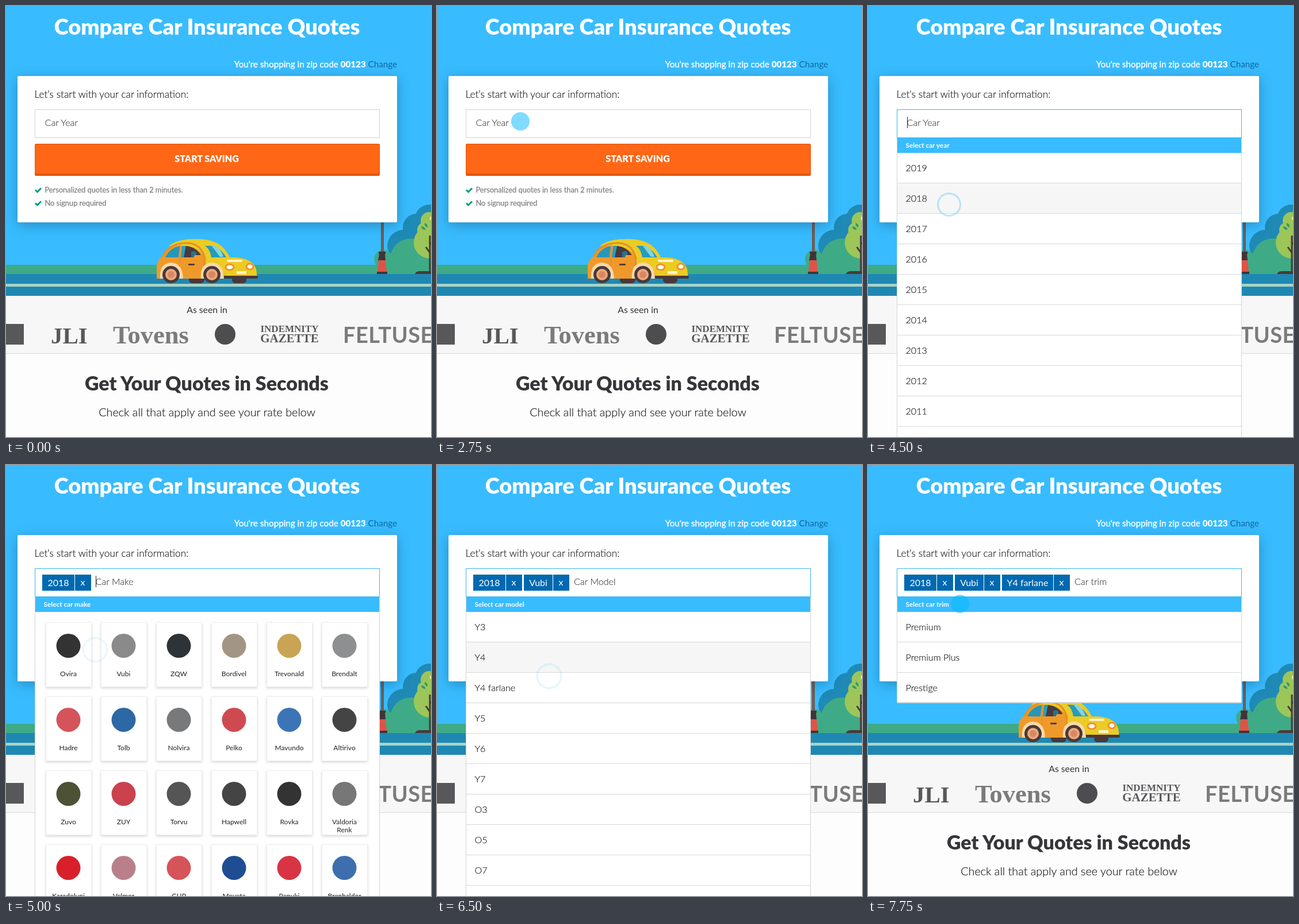
These frames come from a looping animation (739x751 px, 8 s). An HTML page:

```html
<!DOCTYPE html>
<html lang="en">
<head>
<meta charset="utf-8">
<title>Compare Car Insurance Quotes</title>
<style>
html, body { margin: 0; width: 100%; height: 100%; overflow: hidden; background: #fdfdfd; }
svg { display: block; width: 100%; height: 100%; font-family: Lato, sans-serif; }
.mid { text-anchor: middle; }
.black { font-weight: 900; }
.light, .row, .hint { font-weight: 300; fill: #1c1c1c; stroke: #1c1c1c; stroke-width: .2px; }
.row, .hint { font-size: 16.1px; }
.hint { fill: #444; stroke: #444; }
.head { font-size: 11.8px; font-weight: 700; fill: #fff; }
.make { font-size: 12px; fill: #222; text-anchor: middle; }
.note { font-size: 12.8px; fill: #808080; stroke: #808080; stroke-width: .25px; }
.chip rect { fill: #0069b0; }
.chip text { font-size: 16px; fill: #fff; }
.serif { font-family: "Liberation Serif", serif; font-weight: 700; }
.card { filter: drop-shadow(0 5px 11px rgba(0, 30, 60, .3)); }
.tile { filter: drop-shadow(0 2px 2px rgba(0, 0, 0, .16)); }

/* One loop is 8 s; every 3.125% is a 250 ms step. */
.timed { animation: 8s step-end infinite both; }
.caret { fill: #222; animation: blink 1s step-end infinite; }
.focus { animation-name: focus; }
.ask-year { animation-name: ask-year; }
.ask-make { animation-name: ask-make; }
.ask-model { animation-name: ask-model; }
.ask-trim, .chip-model { animation-name: ask-trim; }
.chip-year { animation-name: chip-year; }
.chip-make { animation-name: chip-make; }
#year { animation-name: list-year; }
#make { animation-name: ask-make; }
#model { animation-name: ask-model; }
#trim { animation-name: list-trim; }
#hover { animation-name: hover; }
#press { animation-name: press; }
#ring { animation-name: ring; }

@keyframes blink { 0% { opacity: 1 } 50%, to { opacity: 0 } }
@keyframes focus { 0% { opacity: 0 } 40.625%, to { opacity: 1 } }
@keyframes ask-year { 0% { opacity: 1 } 59.375%, to { opacity: 0 } }
@keyframes ask-make { 0% { opacity: 0 } 59.375% { opacity: 1 } 71.875%, to { opacity: 0 } }
@keyframes ask-model { 0% { opacity: 0 } 71.875% { opacity: 1 } 87.5%, to { opacity: 0 } }
@keyframes ask-trim { 0% { opacity: 0 } 87.5%, to { opacity: 1 } }
@keyframes chip-year { 0% { opacity: 0 } 59.375%, to { opacity: 1 } }
@keyframes chip-make { 0% { opacity: 0 } 71.875%, to { opacity: 1 } }
@keyframes list-year { 0% { opacity: 0 } 40.625% { opacity: 1 } 59.375%, to { opacity: 0 } }
@keyframes list-trim { 0% { opacity: 0 } 96.875%, to { opacity: 1 } }
@keyframes hover {
  0% { opacity: 0; transform: translateY(0) }
  43.75% { opacity: 1; transform: translateY(0) }
  50% { transform: translateY(53px) }
  59.375% { opacity: 0 }
  75% { opacity: 1; transform: translateY(53px) }
  84.375% { transform: translateY(106px) }
  87.5%, to { opacity: 0; transform: translateY(0) }
}
@keyframes press {
  0% { opacity: 0; transform: translate(123px, 315px) }
  12.5% { opacity: 1; transform: translate(123px, 315px) }
  15.625% { transform: translate(130px, 270px) }
  18.75% { transform: translate(140px, 214px) }
  21.875% { opacity: 0 }
  28.125% { opacity: 1; transform: translate(145px, 219px) }
  31.25% { opacity: 0 }
  34.375% { opacity: 1; transform: translate(145px, 201px) }
  40.625% { opacity: 0 }
  43.75% { opacity: 1; transform: translate(137px, 290px) }
  46.875% { transform: translate(139px, 308px) }
  50% { transform: translate(140px, 328px) }
  53.125% { transform: translate(141px, 346px) }
  56.25% { opacity: 0 }
  59.375% { opacity: 1; transform: translate(155px, 322px) }
  62.5% { opacity: 0 }
  65.625% { opacity: 1; transform: translate(175px, 322px) }
  68.75% { transform: translate(195px, 326px) }
  71.875% { opacity: 0 }
  75% { opacity: 1; transform: translate(194px, 330px) }
  78.125% { transform: translate(195px, 352px) }
  81.25% { opacity: 0 }
  84.375% { opacity: 1; transform: translate(200px, 390px) }
  87.5% { opacity: 0 }
  93.75% { opacity: 1; transform: translate(160px, 214px) }
  96.875%, to { opacity: 1; transform: translate(160px, 242px) }
}
@keyframes ring {
  0% { opacity: 0; transform: translate(145px, 180px) }
  21.875% { opacity: .5; transform: translate(145px, 180px) }
  25% { opacity: 0 }
  31.25% { opacity: .4; transform: translate(145px, 219px) }
  34.375% { opacity: 0 }
  40.625% { opacity: .5; transform: translate(145px, 201px) }
  43.75% { opacity: 0 }
  56.25% { opacity: .55; transform: translate(141px, 346px) }
  59.375% { opacity: 0 }
  62.5% { opacity: .18; transform: translate(155px, 322px) scale(1.06) }
  65.625% { opacity: 0 }
  71.875% { opacity: .5; transform: translate(195px, 326px) }
  75% { opacity: 0 }
  81.25% { opacity: .22; transform: translate(195px, 368px) scale(1.07) }
  84.375% { opacity: 0 }
  87.5% { opacity: .5; transform: translate(202px, 397px) }
  90.625% { opacity: .1; transform: translate(202px, 397px) scale(1.06) }
  93.75%, to { opacity: 0 }
}
</style>
</head>
<body>
<svg viewBox="0 0 739 751">
  <rect width="739" height="505" fill="#38bcff"/>

  <!-- scenery -->
  <g fill="#1f8ab5">
    <circle cx="691" cy="418" r="28"/><circle cx="714" cy="386" r="24"/><circle cx="736" cy="371" r="25"/>
    <rect x="700" y="385" width="39" height="70"/>
  </g>
  <rect y="451" width="739" height="16" fill="#3fab86"/>
  <g fill="#3fab86">
    <circle cx="656" cy="441" r="16"/><circle cx="704" cy="441" r="36"/><rect x="652" y="436" width="87" height="31"/>
  </g>
  <g fill="#9cc659">
    <circle cx="737" cy="412" r="28"/><circle cx="736" cy="374" r="15"/><circle cx="728" cy="390" r="13"/>
  </g>
  <circle cx="741" cy="370" r="4" fill="#f4edb0"/>
  <path d="M722 384q6 0 8 6q-8 0 -8 -6M728 378q6 2 5 8q-6 -2 -5 -8" fill="#2c9a6b"/>
  <path d="M737 400V463M737 430L730 420M737 416L739 412" stroke="#4b3b39" stroke-width="3" fill="none"/>
  <path d="M711 467q2 -5 9 -5h19v5z" fill="#493a38"/>
  <rect x="652" y="370" width="5" height="60" fill="#705d54"/>
  <path d="M648 428h12v4h-1l1 12h-13l2 -12h-1zM645 463h18v4h-18z" fill="#40343a"/>
  <path d="M648 443h12l2 20h-16z" fill="#e05347"/>
  <rect y="467" width="739" height="38" fill="#1f88b2"/>
  <rect y="484" width="739" height="5" fill="#a8d3c5"/>

  <!-- car -->
  <g fill="#493838"><rect x="318" y="470" width="27" height="13" rx="6"/><rect x="393" y="470" width="25" height="13" rx="6"/></g>
  <path d="M262 475V452Q264 441 272 437C281 415 300 406 330 406C362 406 379 416 389 438C412 437 431 443 435 459L437 475Z" fill="#f0992b"/>
  <path d="M283 418C295 409 310 406 330 406C362 406 379 416 389 438C412 437 431 443 435 459L437 475H381Q378 450 347 449Q346 413 283 418Z" fill="#eccb25"/>
  <path d="M277 438Q284 422 302 418L300 438Z" fill="#2697b9"/>
  <path d="M305 438L307 418Q331 417 341 438Z" fill="#463b40"/>
  <path d="M304 438L306 418H313L309 438Z" fill="#2b9cba"/>
  <path d="M322 438V429q5 -4 9 0v9z" fill="#2e718a"/>
  <path d="M346 418Q370 415 383 438H357Q355 424 346 418Z" fill="#279bb9"/>
  <path d="M357 417L372 437H378Q374 423 363 417Z" fill="#83d5dc"/>
  <path d="M272 437Q284 412 317 413Q340 415 346 440L343 470" fill="none" stroke="#e58e26" stroke-width="3"/>
  <path d="M303 416L302 468" stroke="#dc8726"/>
  <rect x="327" y="434" width="15" height="6" rx="3" fill="#f39a24"/>
  <rect x="317" y="449" width="11" height="3" rx="1" fill="#51403b"/>
  <rect x="384" y="442" width="27" height="4" rx="2" fill="#fff0cf"/>
  <g fill="#fff" stroke="#ee9328" stroke-width="3"><ellipse cx="389" cy="455" rx="7" ry="5"/><ellipse cx="424" cy="454" rx="6" ry="5"/></g>
  <rect x="401" y="462" width="17" height="5" fill="#fff1d0"/>
  <rect x="376" y="470" width="62" height="5" rx="2" fill="#493838"/>
  <g id="wheel">
    <path d="M268 475Q266 448 287 447Q307 448 308 475Z" fill="#fad9aa"/>
    <circle cx="287" cy="468" r="15" fill="#493838"/><circle cx="287" cy="468" r="10" fill="#eda77b"/>
    <circle cx="287" cy="468" r="6" fill="#d88961"/>
  </g>
  <use href="#wheel" x="71"/>

  <!-- page header and form -->
  <text x="349.5" y="50" class="mid black" font-size="38" fill="#fff">Compare Car Insurance Quotes</text>
  <text x="680" y="107" text-anchor="end" font-size="15.2" fill="#fff"><tspan stroke="#fff" stroke-width=".35">You're shopping in zip code</tspan> <tspan class="black">00123</tspan> <tspan fill="#1068a0">Change</tspan></text>
  <rect x="20" y="122" width="660" height="255" rx="2" fill="#fff" class="card"/>
  <text x="49.5" y="160" class="light" font-size="17.3">Let's start with your car information:</text>
  <rect x="50.5" y="180.5" width="599" height="49" fill="#fff" stroke="#d2d2d2"/>
  <rect x="50" y="240" width="600" height="56" rx="2" fill="#e2570d"/>
  <rect x="51" y="241" width="598" height="51" rx="1" fill="#ff6716"/>
  <text x="349" y="272" class="mid black" font-size="16" fill="#fff">START SAVING</text>
  <path id="check" d="M51 320.5l3.5 3.5l6.5 -6.5" fill="none" stroke="#0b9a80" stroke-width="3"/>
  <use href="#check" y="23"/>
  <text x="67.5" y="325" class="note">Personalized quotes in less than 2 minutes.</text>
  <text x="67.5" y="348" class="note">No signup required</text>

  <!-- press strip -->
  <rect y="505" width="739" height="246" fill="#fdfdfd"/>
  <rect y="505" width="739" height="100" fill="#f7f7f8"/>
  <rect y="605" width="739" height="1" fill="#d9d9dc"/>
  <text x="349.5" y="535" class="mid" font-size="15.8" fill="#333">As seen in</text>
  <rect x="-5" y="554" width="36" height="36" fill="#58585a"/>
  <g class="serif" fill="#58585a">
    <text x="78" y="588" font-size="41">JLI</text>
    <text x="186" y="588" font-size="44.5" fill="#7b7b7b">Tovens</text>
    <text x="493" y="568" class="mid" font-size="17">INDEMNITY</text>
    <text x="493" y="586" class="mid" font-size="21">GAZETTE</text>
  </g>
  <circle cx="381" cy="572" r="18" fill="#4d4d4f"/>
  <text x="586" y="587" font-size="38" font-weight="700" letter-spacing=".5" fill="#7b7b7b">FELTUSE</text>
  <text x="349" y="670" class="mid black" font-size="34" fill="#36363a">Get Your Quotes in Seconds</text>
  <text x="349.5" y="715" class="mid light" font-size="19.8">Check all that apply and see your rate below</text>

  <!-- drop-down lists -->
  <g id="year" class="timed"></g>
  <g id="make" class="timed"></g>
  <g id="model" class="timed"></g>
  <g id="trim" class="timed"></g>
  <rect id="hover" class="timed" x="51" y="256" width="598" height="52" fill="#000" fill-opacity=".035"/>
  <path class="timed focus" d="M50.5 229.5V180.5H649.5V229.5Z" fill="none" stroke="#38b6f0"/>

  <!-- field content -->
  <g class="timed ask-year">
    <text x="67.5" y="209" class="hint">Car Year</text>
    <g class="timed focus"><rect class="caret" x="68" y="193" width="1" height="20" style="animation-delay:-.75s"/></g>
  </g>
  <g class="timed ask-make">
    <text x="155.5" y="209" class="hint">Car Make</text>
    <rect class="caret" x="156" y="193" width="1" height="20" style="animation-delay:-.25s"/>
  </g>
  <g class="timed ask-model">
    <text x="238" y="209" class="hint">Car Model</text>
    <rect class="caret" x="238" y="193" width="1" height="20" style="animation-delay:-.25s"/>
  </g>
  <g class="timed ask-trim">
    <text x="359" y="209" class="hint">Car trim</text>
    <rect class="caret" x="359" y="193" width="1" height="20"/>
  </g>
  <g id="chips"></g>

  <circle id="press" class="timed" r="16" fill="#00b7ff" fill-opacity=".5"/>
  <circle id="ring" class="timed" r="19.5" fill="none" stroke="#7fd3f6" stroke-width="3"/>
</svg>
<script>
const fill = (id, html) => { document.getElementById(id).innerHTML = html; };

const panel = (title, height) => `
  <rect x="50.5" y="229.5" width="599" height="${height + 26}" fill="#fff" stroke="#d4d4d4"/>
  <rect x="51" y="229" width="598" height="27" fill="#38bcff"/>
  <text x="65.5" y="247" class="head">${title}</text>`;

const list = (title, items) => panel(title, items.length * 53 - 1) + items.map((item, i) => `
  <rect x="51" y="${308 + i * 53}" width="598" height="1" fill="#d9d9d9"/>
  <text x="65.5" y="${288 + i * 53}" class="row">${item}</text>`).join('');

const makes = [
  ['Ovira', '#333'], ['Vubi', '#8a8a8a'], ['ZQW', '#2e3338'], ['Bordivel', '#a39584'], ['Trevonald', '#c9a455'], ['Brendalt', '#8d8f90'],
  ['Hadre', '#d5545a'], ['Tolb', '#2c68a4'], ['Nolvira', '#77797a'], ['Pelko', '#cf4a50'], ['Mavundo', '#3c75b5'], ['Altirivo', '#444'],
  ['Zuvo', '#4d5135'], ['ZUY', '#c9424e'], ['Torvu', '#555'], ['Hapwell', '#444'], ['Rovka', '#333'], ['Valdoria Renk', '#777'],
  ['Karadoluni', '#d8202b'], ['Velmor', '#b9808c'], ['GUP', '#d5545a'], ['Moveta', '#1f4d93'], ['Renuki', '#d83444'], ['Brenhaldor', '#3d6fae']
];

const tile = ([name, color], i) => {
  const x = 69 + i % 6 * 96, y = 274 + Math.floor(i / 6) * 129;
  const lines = name.split(' ').map((word, n) =>
    `<text x="${x + 39.5}" y="${y + 94 + n * 14}" class="make">${word}</text>`).join('');
  return `<rect x="${x + .5}" y="${y + .5}" width="79" height="112" fill="#fff" stroke="#eee" class="tile"/>
    <circle cx="${x + 39.5}" cy="${y + 41}" r="21" fill="${color}"/>${lines}`;
};

const chip = (name, label, x, width) => `<g class="timed chip chip-${name}">
  <rect x="${x}" y="191" width="${width}" height="28"/><rect x="${x + width + 1}" y="191" width="28" height="28"/>
  <text x="${x + width / 2}" y="211" class="mid">${label}</text>
  <text x="${x + width + 14.5}" y="210" class="mid">x</text></g>`;

fill('year', list('Select car year', Array.from({ length: 10 }, (_, i) => 2019 - i)));
fill('make', panel('Select car make', 530) + makes.map(tile).join(''));
fill('model', list('Select car model', ['Y3', 'Y4', 'Y4 farlane', 'Y5', 'Y6', 'Y7', 'O3', 'O5', 'O7', 'O8']));
fill('trim', list('Select car trim', ['Premium', 'Premium Plus', 'Prestige']));
fill('chips', chip('year', '2018', 63, 56) + chip('make', 'Vubi', 151, 50) + chip('model', 'Y4 farlane', 233, 89));
</script>
</body>
</html>
```
